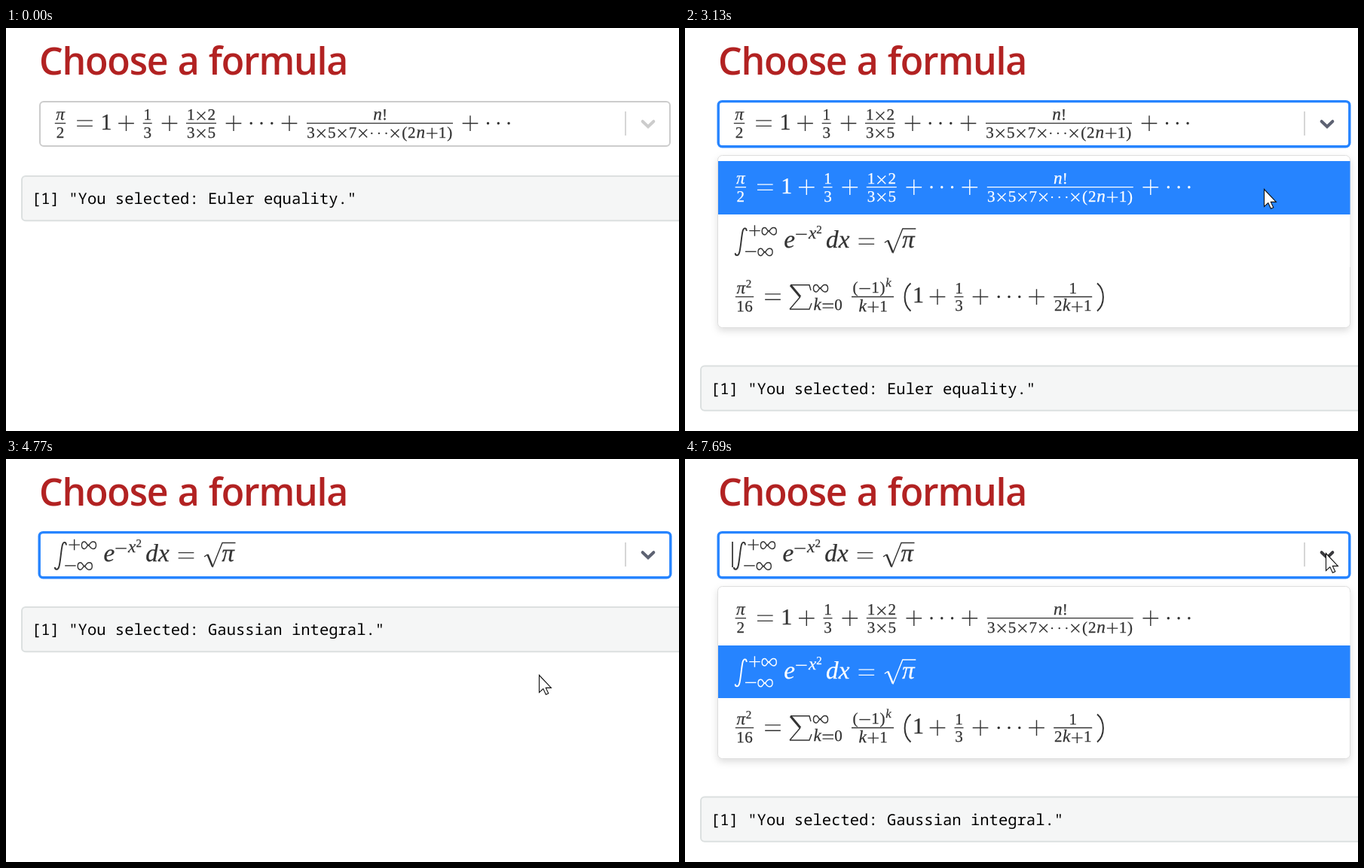
Animation, 893 px wide and 536 px high, one loop 8 s. Source, as an HTML page:

```html
<!DOCTYPE html>
<html lang="en">
<head>
<meta charset="utf-8">
<title>Choose a formula</title>
<style>
html, body { margin: 0; width: 100%; height: 100%; overflow: hidden; background: #fff; }
svg { display: block; width: 893px; height: 536px; }
.title { font: 600 50px "Open Sans", "Noto Sans", sans-serif; letter-spacing: -1.2px; word-spacing: 1.5px; fill: #b22222; }
.code { font: 20.54px "Noto Sans Mono", "DejaVu Sans Mono", monospace; white-space: pre; text-rendering: geometricPrecision; }
.math { color: #333; font-family: "Liberation Serif", "Noto Serif", serif; text-anchor: middle; }
.math text { fill: currentColor; stroke: currentColor; stroke-width: .25; text-rendering: geometricPrecision; }
.math path { fill: none; stroke: currentColor; stroke-width: 1.4; }
.math .dots { stroke-linecap: round; }
.menu { filter: drop-shadow(0 4px 5px rgba(0,0,0,.13)); }
</style>
</head>
<body>
<svg viewBox="0 0 893 536">
  <text class="title" x="44" y="62">Choose a formula</text>
  <rect id="box" fill="#fff"/>
  <g class="math" id="value1"></g>
  <g class="math" id="value2"></g>
  <path id="caret" d="M63 110V144" stroke="#222" stroke-width="1.6"/>
  <path d="M822 111V143" stroke="#ccc" stroke-width="1.6"/>
  <path id="chevron" d="M844.7 124.2L852 131.2L859.3 124.2" fill="none" stroke-width="4" stroke-linecap="round"/>
  <g id="output">
    <rect x="21" y="197" width="900" height="59.3" rx="5" fill="#f5f6f6" stroke="#dce0e0" stroke-width="2"/>
    <text class="code" id="line" x="34" y="234"></text>
  </g>
  <g id="menu">
    <rect class="menu" x="43.5" y="169.5" width="839" height="229" rx="6" fill="#fff" stroke="#dedede"/>
    <rect id="row1" x="44" y="177" width="838.5" height="71"/>
    <rect id="row2" x="44" y="248" width="838.5" height="70"/>
    <g class="math" id="item1" transform="translate(1.8 85)"></g>
    <g class="math" id="item2" transform="translate(1.8 155.5)"></g>
    <g class="math" id="item3"></g>
  </g>
  <g id="pointer">
    <circle id="press" r="18" fill="#ff0" fill-opacity=".55"/>
    <path d="M.5 .5V23.5L5.8 18.6L9.4 26.2L12.8 24.8L9.3 17.4H16.4Z" fill="#fff" stroke="#111" stroke-width="1.1"/>
  </g>
</svg>
<script>
const LOOP = 8000, STEP = 70, BIG = 31, SMALL = 21.7, TINY = 15.5;
const $ = id => document.getElementById(id);

// Glyph widths in em; digits are half an em.
const widths = { '×': .778, '+': .778, '−': .778, '=': .778, '(': .389, ')': .389, '!': .278,
  n: .6, k: .521, 'π': .57, x: .572, e: .466, d: .52, '…': 1.172, '∞': 1 };
const width = ch => widths[ch] || .5;

const path = (d, w = '') => `<path d="${d}"${w && ` style="stroke-width:${w}"`}/>`;
const hline = (x, y, r) => `M${x - r} ${y}h${2 * r}`;

function glyph(ch, x, base, size = BIG) {
  const y = base - size / 4, r = size / 3, q = size / 4;
  switch (ch) {
    case '+': return path(hline(x, y, r) + `M${x} ${y - r}v${2 * r}`);
    case '−': return path(hline(x, y, r));
    case '=': return path(hline(x, y - size * .117, r) + hline(x, y + size * .117, r));
    case '×': return path(`M${x - q} ${y - q}l${2 * q} ${2 * q}m0 ${-2 * q}l${-2 * q} ${2 * q}`);
    case '…': return [-1, 0, 1].map(i =>
      `<path class="dots" d="M${x + i * size * .444} ${y}h.01" style="stroke-width:${size * .11}"/>`).join('');
    case '∞': {
      const loop = s => `C${.06 * s} ${-.1 * s} ${.15 * s} -.22 ${.26 * s} -.22`
        + `C${.5 * s} -.22 ${.5 * s} .22 ${.26 * s} .22C${.15 * s} .22 ${.06 * s} ${.1 * s} 0 0`;
      return `<path transform="translate(${x} ${y + size * .03}) scale(${size})" d="M0 0${loop(1)}${loop(-1)}" style="stroke-width:.065"/>`;
    }
  }
  const italic = /[a-zπ]/.test(ch);
  const scale = italic ? 1.07 : .97;
  return `<text x="${x}" y="${base}" font-size="${size * scale}"${italic ? ' font-style="italic"' : ''}>${ch}</text>`;
}

// A run of glyphs centred on cx.
function run(str, cx, base, size = SMALL) {
  const total = [...str].reduce((sum, ch) => sum + width(ch), 0) * size;
  let x = cx - total / 2, out = '';
  for (const ch of str) {
    const w = width(ch) * size;
    out += glyph(ch, x + w / 2, base, size);
    x += w;
  }
  return out;
}

const frac = (num, den, cx, half, axis) =>
  path(hline(cx, axis, half), 1.3) + run(num, cx, axis - 4.4) + run(den, cx, axis + 18.8);

function series() {
  const a = 126.7, b = 134.5;
  const put = (ch, ...xs) => xs.map(x => glyph(ch, x, b)).join('');
  return frac('π', '2', 72, 7.2, a) + put('=', 104.5) + put('1', 133) + put('+', 159.5, 217, 302, 376, 616)
    + frac('1', '3', 187.7, 6, a) + frac('1×2', '3×5', 259, 20, a) + put('…', 339, 653.3)
    + frac('n!', '3×5×7×…×(2n+1)', 496, 97, a);
}

function gauss() {
  const b = 136;
  return path('M80 114.5C79.5 109.5 76 109.8 74.8 114.5C73 122 72.3 136 70.4 143C69 148 65.2 147.8 64.8 143.8', 1.9)
    + run('+∞', 101.5, 119.5) + run('−∞', 96.3, 147.3)
    + glyph('e', 136.8, b) + run('−x', 158.8, 124.3) + glyph('2', 176.3, 117, TINY)
    + glyph('d', 193.5, b) + glyph('x', 209.3, b) + glyph('=', 239, b)
    + path('M263 130L267.5 127') + path('M267.5 127L274 143', 2.5) + path('M274 144L287 111.5H304.5')
    + glyph('π', 294.5, b);
}

function sum() {
  const a = 357.5, b = 365.3;
  return path(hline(79, a, 12.2), 1.3) + glyph('π', 74.3, 353.4, SMALL) + glyph('2', 84.5, 345, TINY)
    + run('16', 79, 376.5) + glyph('=', 116.5, b)
    + path('M167 349L165 341.8H140M139 374H165L168 366') + path('M140 342L153 357.5', 3) + path('M153 357.5L139 374')
    + glyph('∞', 180, 351, SMALL) + run('k=0', 189.5, 375)
    + path(hline(249, a, 28), 1.3) + run('(−1)', 244, 352) + glyph('k', 270, 343.5, TINY) + run('k+1', 249.5, 376.5)
    + path('M299.5 339.5C289 348.5 289 367.5 299.5 376.5', 2) + glyph('1', 309.5, b)
    + [335, 392, 466.5].map(x => glyph('+', x, b)).join('') + frac('1', '3', 363.5, 6, a)
    + glyph('…', 430, b) + frac('1', '2k+1', 514.7, 25.5, a)
    + path('M547 339.5C557.5 348.5 557.5 367.5 547 376.5', 2);
}

$('value1').innerHTML = $('item1').innerHTML = series();
$('value2').innerHTML = $('item2').innerHTML = gauss();
$('item3').innerHTML = sum();

// Pointer moves: rows of [time, x, y].
const moves = [
  [[730, 762, 471], [870, 775, 390], [1010, 790, 262], [1150, 812, 185], [1290, 846, 112], [1360, 866, 95], [1500, 852, 126]],
  [[1570, 851, 127], [1910, 854, 130]],
  [[2110, 854, 133]],
  [[2850, 849, 138], [2990, 815, 165], [3130, 768, 214], [3270, 744, 243], [3550, 718, 270], [3620, 714, 274]],
  [[3690, 712, 277], [3970, 707, 287]],
  [[5630, 711, 281], [5770, 735, 238], [5910, 778, 172], [6120, 829, 98], [6260, 844, 102], [6400, 847, 111]],
  [[6470, 847, 112], [6750, 850, 122]],
  [[6950, 850, 125]]
];
// Clicks: appear half, full, fade half, gone.
const clicks = [[2110, 2180, 2380, 2450], [4300, 4370, 4500, 4570], [7350, 7420, 7620, 7690]];
const carets = [[2380, 2910], [3440, 3970], [4500, 4640], [7620, LOOP]];

const within = (t, a, b) => t >= a && t < b;
const show = (id, on) => $(id).setAttribute('visibility', on ? 'visible' : 'hidden');
const set = (id, attrs) => { for (const k in attrs) $(id).setAttribute(k, attrs[k]); };

function pointerAt(t) {
  const move = moves.filter(m => m[0][0] <= t).pop();
  if (!move) return null;
  const start = move[0][0];
  const q = start + Math.floor((t - start) / STEP) * STEP;
  const i = move.findIndex(p => p[0] > q);
  if (i < 0) return move[move.length - 1].slice(1);
  const [t0, x0, y0] = move[i - 1], [t1, x1, y1] = move[i];
  const u = (q - t0) / (t1 - t0);
  return [x0 + (x1 - x0) * u, y0 + (y1 - y0) * u];
}

function pressAt(t) {
  const c = clicks.find(c => within(t, c[0], c[3]));
  return !c ? 0 : within(t, c[1], c[2]) ? 1 : .5;
}

function draw(t) {
  const open = within(t, 2380, 4640) || t >= 7420;
  const focused = t >= 2380, second = t >= 4640;
  const pos = pointerAt(t);
  const inBox = pos && pos[1] > 96 && pos[1] < 158;
  const onArrow = inBox && pos[0] > 822;

  set('box', focused
    ? { x: 44.2, y: 97.6, width: 837.6, height: 60.2, rx: 5, stroke: '#2684ff', 'stroke-width': 3.4 }
    : { x: 45, y: 98, width: 836, height: 59, rx: 5, stroke: inBox ? '#b3b3b3' : '#ccc', 'stroke-width': 2 });
  set('chevron', { stroke: focused ? (onArrow ? '#3a3a3e' : '#5d6272') : onArrow ? '#999' : '#ccc' });
  show('value1', !second);
  show('value2', second);
  show('caret', carets.some(c => within(t, ...c)));

  show('menu', open);
  const hover = pos && within(pos[1], 248, 318);
  set('row1', { fill: second ? '#fff' : '#2684ff' });
  set('row2', { fill: second ? '#2684ff' : !hover ? '#fff' : t >= 4300 ? '#b2d4ff' : '#deebff' });
  $('item1').style.color = second ? '#333' : '#fff';
  $('item2').style.color = second ? '#fff' : '#333';

  set('output', { transform: `translate(0 ${open ? 252.5 : 0})` });
  $('line').textContent = `[1] "You selected: ${t >= 4770 ? 'Gaussian integral' : 'Euler equality'}."`;

  show('pointer', pos);
  if (pos) set('pointer', { transform: `translate(${pos})` });
  set('press', { opacity: pressAt(t) });
}

const began = performance.now();
function tick() {
  draw((performance.now() - began) % LOOP);
  requestAnimationFrame(tick);
}
tick();
</script>
</body>
</html>
```
